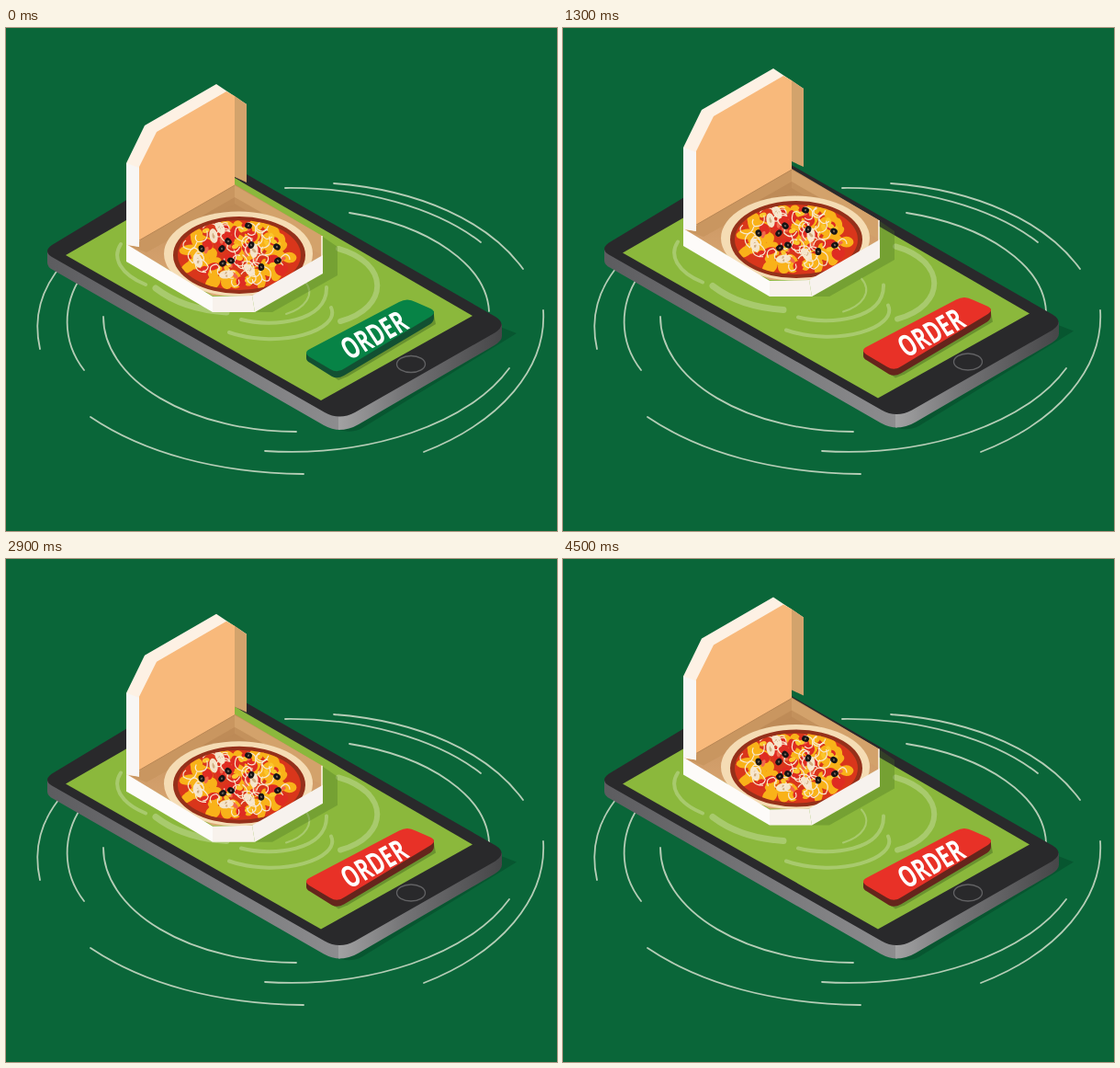
Animation, 600 px wide and 547 px high, one loop 4.6 s. Source, as an HTML page:

```html
<!DOCTYPE html>
<html lang="en">
<head>
<meta charset="utf-8">
<title>Pizza order</title>
<style>
html, body { margin: 0; width: 100%; height: 100%; overflow: hidden; background: #0a6639; }
svg { display: block; width: 600px; height: 547px; }
.lines { fill: none; stroke: #b5cdb6; stroke-width: 1.8; stroke-linecap: round; }
.waves { fill: none; stroke: #fff; stroke-opacity: .25; stroke-width: 4; stroke-linecap: round; }
text { font: 700 20px "Open Sans", "Noto Sans", sans-serif; fill: #fff; }
</style>
</head>
<body>
<svg viewBox="0 0 600 547">
  <defs>
    <linearGradient id="front"><stop stop-color="#5c5c5f"/><stop offset="1" stop-color="#8d8d8f"/></linearGradient>
    <linearGradient id="side"><stop stop-color="#a2a2a3"/><stop offset=".4" stop-color="#747476"/><stop offset="1" stop-color="#464648"/></linearGradient>
    <linearGradient id="floor" x2="0" y2="1"><stop stop-color="#c08c58"/><stop offset="1" stop-color="#dca975"/></linearGradient>
    <clipPath id="dish"><ellipse cx="254" cy="247" rx="67" ry="38"/></clipPath>
  </defs>

  <g class="lines">
    <path d="M304 174A256 142 0 0 1 517 233"/>
    <path d="M357 169C450 176 525 210 563 262"/>
    <path d="M374 201A210 115 0 0 1 526 308"/>
    <path d="M585 307A275 173 0 0 1 455 461"/>
    <path d="M548 370A258 147 0 0 1 282 460"/>
    <path d="M316 439A210 125 0 0 1 106 314"/>
    <path d="M92 423C150 462 230 484 324 485"/>
    <path d="M85 372C60 340 62 300 82 270"/>
    <path d="M37 349C30 318 36 286 62 256"/>
  </g>

  <g id="phone">
    <path d="M525 320L556 332 388 435Q375 442 360 436Z" fill="#075630"/>
    <path d="M45 242V255Q45 260 51 263L346 432Q355 437 364 437V420Z" fill="url(#front)"/>
    <path d="M362 420V437Q374 437 384 431L532 345Q540 340 540 335V322Z" fill="url(#side)"/>
    <path d="M50 236L206 142Q218 134 232 142L533 314Q546 322 533 331L380 418Q363 427 347 418L50 249Q40 243 50 236Z" fill="#29292b"/>
    <path d="M65 247L230 152 508 313 343 405Z" fill="#8bb83c"/>
    <g class="waves">
      <path d="M362 240C418 256 418 304 364 319" stroke-width="6"/>
      <path d="M256 317C290 326 350 320 349 282"/>
      <path d="M243 331C300 350 365 328 354 304"/>
      <path d="M305 311C325 305 338 290 325 275" stroke-width="2"/>
      <path d="M125 235C115 250 125 268 152 279"/>
      <path d="M163 283C185 300 210 307 240 309" stroke-width="7"/>
    </g>
    <ellipse cx="441" cy="365.500" rx="15.500" ry="9" fill="none" stroke="#626264" stroke-width="1.300"/>
    <path d="M332 362L362 383 372 379 468 322 466 312Z" fill="#4f7426" opacity=".55"/>
    <path id="edge" d="M327 354V359Q327 362 331 364L355 379Q361 382 368 378L462 322Q466 319 466 315V308Z"/>
    <path id="face" d="M331 349L428 298Q437 293 446 298L462 305Q470 309 462 314L369 370Q361 376 353 371L331 358Q323 353 331 349Z"/>
    <text transform="matrix(.97 -.515 .91 1.4 374 361.500)">ORDER</text>
  </g>

  <g id="box">
    <path d="M345 227L361 238V269L290 309H271L345 267Z" fill="#47701f" opacity=".32"/>
    <path d="M131 236L249 170 344 226V248L268 291H225Z" fill="url(#floor)"/>
    <path d="M249 171L344 226V247L249 191Z" fill="#d3a26b"/>
    <path d="M249 171V191L153 244 131 236Z" fill="#c99660"/>
    <path d="M249 184L284 204 214 204Z" fill="#b68451" opacity=".55"/>
    <ellipse cx="253" cy="245.500" rx="81" ry="46" fill="#f5dcb4"/>
    <ellipse cx="254" cy="247" rx="72" ry="42" fill="#95301a"/>
    <ellipse cx="254" cy="247" rx="67" ry="38" fill="#d9361b"/>
    <g id="toppings" clip-path="url(#dish)"></g>
    <path d="M131 235L225 292V309L131 254Z" fill="#fdfbf9"/>
    <path d="M225 292L268 291 271 309H225Z" fill="#f8f2ec"/>
    <path d="M268 291L345 247V267L271 309Z" fill="#f7f2ee"/>
    <path d="M344 226V249" stroke="#fff5e8" stroke-width="1.500"/>
    <path d="M131 147L151 106 229 61 262 83 249 90 145 232V238L131 236Z" fill="#fdf1e4"/>
    <path d="M131 147L145 152V238L131 235Z" fill="#f8f6f4"/>
    <path d="M145 231V151L164 113 240 69 249 74V171Z" fill="#f8b97b"/>
    <path d="M249 74L262 83V168L249 162Z" fill="#d3a36c"/>
    <path d="M145 231L249 171" stroke="#b98755" stroke-width="1"/>
  </g>
</svg>
<script>
const byId = id => document.getElementById(id);
const phone = byId("phone"), box = byId("box"), face = byId("face"), edge = byId("edge");

let seed = 11;
const random = () => (seed = seed * 16807 % 2147483647) / 2147483647;

// A random point on the pizza, spread evenly over its ellipse.
function spot(reach) {
  const angle = random() * Math.PI * 2, r = Math.sqrt(random()) * reach;
  return [254 + Math.cos(angle) * 66 * r, 246 + Math.sin(angle) * 37 * r];
}
const oval = ([x, y], rx, ry, fill) => {
  const turn = random() * 180;
  return `<ellipse cx="${x}" cy="${y}" rx="${rx}" ry="${ry}" fill="${fill}" transform="rotate(${turn} ${x} ${y})"/>`;
};
const repeat = (n, draw) => Array.from({ length: n }, draw).join("");
const onion = () => {
  const [x, y] = spot(.9), w = 4 + random() * 5;
  return `<path d="M${x - w} ${y}q${w} ${-w * 1.3} ${w * 2} 0q0 5 -5 6" fill="none" stroke="#f9e8cf" stroke-width="1.2" transform="rotate(${random() * 360} ${x} ${y})"/>`;
};
const olives = [[264, 215], [242, 232], [213, 240], [235, 240], [245, 253], [295, 238], [296, 253], [267, 236], [236, 256], [278, 260]];
const mushrooms = [[233, 217], [226, 226], [265, 263], [240, 268], [270, 242], [209, 253]];

byId("toppings").innerHTML =
  repeat(60, () => oval(spot(.94), 5 + random() * 6, 4 + random() * 3, "#f9b219")) +
  repeat(22, () => oval(spot(.85), 5 + random() * 3, 4 + random() * 2, "#df2c22")) +
  repeat(10, () => oval(spot(.85), 4, 2, "#f2684b")) +
  repeat(14, () => oval(spot(.9), 4, 2.5, "#fbc62c")) +
  mushrooms.map(p => oval(p, 8, 4.5, "#f4e3c8") + oval(p, 3, 1.5, "#d2ad80")).join("") +
  repeat(42, onion) +
  olives.map(p => oval(p, 4, 3.3, "#171515") + oval(p, 1.3, 1, "#73655b")).join("");

function draw(now) {
  const t = Math.floor(now % 4600 / 100) * 100;
  const rise = 1 - Math.abs(t % 3000 / 1500 - 1);
  const pressed = t >= 1000;
  box.setAttribute("transform", `translate(0 ${-19.5 * rise})`);
  phone.setAttribute("transform", `translate(0 ${pressed ? -2.5 : 0})`);
  face.setAttribute("fill", pressed ? "#e83127" : "#078346");
  edge.setAttribute("fill", pressed ? "#65251c" : "#125032");
}
const start = performance.now();
function tick() {
  draw(performance.now() - start);
  requestAnimationFrame(tick);
}
tick();
</script>
</body>
</html>
```
